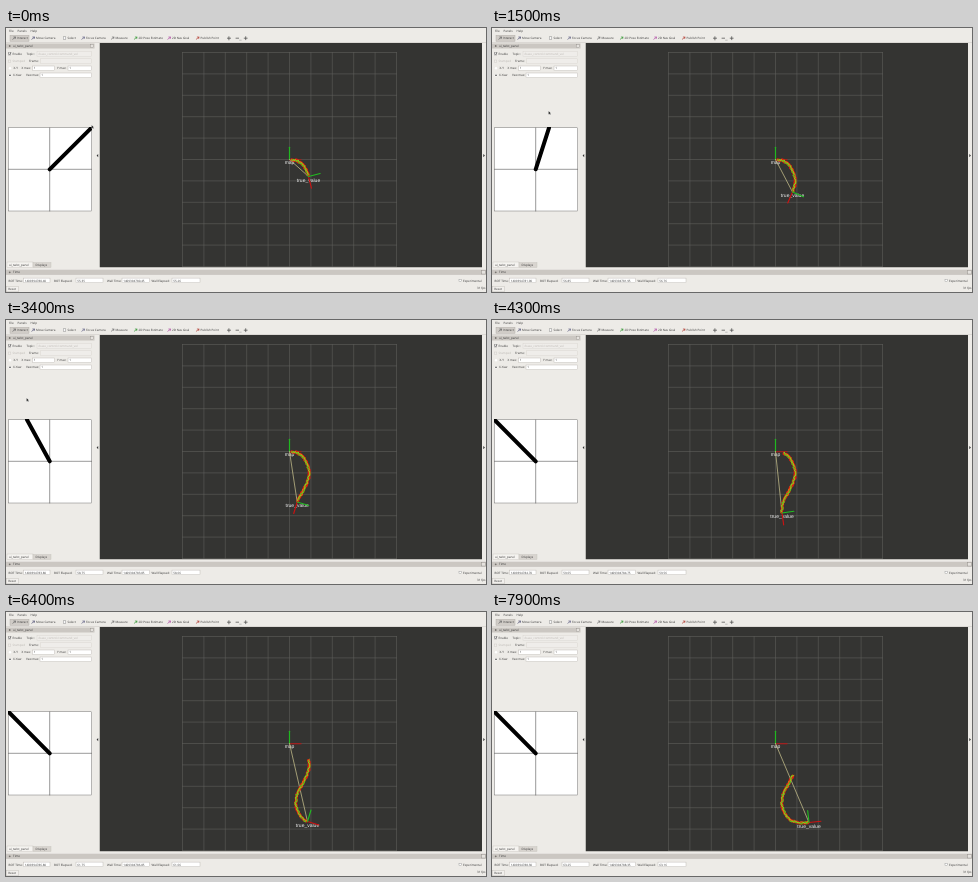
These frames come from a looping animation (480x264 px, 8 s). An HTML page:

```html
<!DOCTYPE html>
<html lang="en">
<head>
<meta charset="utf-8">
<title>Robot teleoperation view</title>
<style>
  html, body { margin: 0; width: 100%; height: 100%; overflow: hidden; background: #edebe7; }
  svg { display: block; width: 100vw; height: 100vh; }
  text { font: 3px "Open Sans", "Noto Sans", sans-serif; fill: #333; text-rendering: geometricPrecision; white-space: pre; }
  .off { fill: #bbb7b2; }
  .tag { font: 5px "Liberation Sans", Arial, sans-serif; fill: #eee; text-anchor: middle; }
  .line { fill: none; stroke-linejoin: round; stroke-linecap: round; }
</style>
</head>
<body>
<svg id="stage" viewBox="0 0 480 264" preserveAspectRatio="none">
  <defs>
    <clipPath id="padClip"><rect x="2" y="99" width="84" height="84.5"/></clipPath>
    <clipPath id="viewClip"><rect x="93.5" y="15" width="382.5" height="224.5"/></clipPath>
  </defs>
  <g id="ui"></g>
  <g id="pad"></g>
  <g id="view" clip-path="url(#viewClip)"></g>
  <path id="cursor" d="M0 0V3.6L.9 2.8L1.5 4.1L2.1 3.8L1.5 2.6H2.6Z" fill="#111" stroke="#fff" stroke-width=".25"/>
</svg>
<script>
const LOOP = 8000, STEP = 100, TRAIL = 6.5;
const $ = id => document.getElementById(id);
const ui = $('ui'), pad = $('pad'), view = $('view');

function add(parent, tag, attrs, content) {
  const el = document.createElementNS('http://www.w3.org/2000/svg', tag);
  for (const k in attrs) el.setAttribute(k, attrs[k]);
  if (content !== undefined) el.textContent = content;
  parent.appendChild(el);
  return el;
}
const rect = (x, y, width, height, fill, stroke = 'none', parent = ui) =>
  add(parent, 'rect', { x, y, width, height, fill, stroke, 'stroke-width': .4 });
const label = (x, y, s, cls = '') => add(ui, 'text', { x, y, class: cls }, s);
const line = (parent, stroke, width, d = '') =>
  add(parent, 'path', { d, stroke, 'stroke-width': width, class: 'line' });
const dot = (cx, cy, r, fill) => add(ui, 'circle', { cx, cy, r, fill });

function field(x, y, width, value = '', off = false) {
  rect(x, y - 2.3, width, 4.6, off ? '#efedea' : '#fff', off ? '#d5d1cc' : '#b5b0aa');
  return label(x + 1.2, y + 1.1, value, off ? 'off' : '');
}
function titleBar(y, width, height, name) {
  rect(0, y, width, height, '#cbc7c2');
  label(7, y + height / 2 + 1, name);
  dot(3.7, y + height / 2, .9, '#77736e');
  rect(width - 4.3, y + height / 2 - 1.7, 3.6, 3.4, '#e5e2de', '#8c8883');
}

function buildToolbar() {
  [[3, 'File'], [11.5, 'Panels'], [24.5, 'Help']].forEach(([x, s]) => label(x, 3.7, s));
  rect(0, 14.5, 480, .5, '#c9c5c0');
  rect(4, 7.3, 19, 6, '#d0ccc7', '#aaa6a1');
  const tools = [
    [11, 'Interact', '#666'], [30, 'Move Camera', '#557'], [61.5, 'Select', '#777'],
    [80, 'Focus Camera', '#668'], [109.5, 'Measure', '#777'], [132.5, '2D Pose Estimate', '#3a9a3a'],
    [166, '2D Nav Goal', '#b04fa5'], [194.5, 'Publish Point', '#b5443a']
  ];
  tools.forEach(([x, s, color], i) => {
    label(x, 11.3, s);
    if (i === 2) rect(x - 4.3, 8.8, 2.6, 2.6, '#f8f8f8', color);
    else line(ui, color, .7, `M${x - 4.2} 11.2l2.6-2M${x - 3.2} 9l1.7.1l-.3 1.5`);
  });
  line(ui, '#444', .7, 'M221.4 10.2h3.2M222.9 8.7v3.2M230 10.2h2.6M238.2 10.2h3M239.7 8.7v3');
  line(ui, '#777', .4, 'M233.6 12.2h1.6');
}

function buildPanel() {
  titleBar(15.5, 88.5, 5, 'ui_twist_panel');
  rect(2.4, 24.6, 2.4, 2.4, '#fff', '#777');
  line(ui, '#222', .5, 'M2.9 25.8l.7.7l1.2-1.7');
  label(6.5, 27, 'Enable');
  label(20.5, 27, 'Topic:');
  field(31, 25.9, 54.5, '/base_control/command_vel', true);
  rect(2.4, 32, 2.4, 2.4, '#efedea', '#cbc7c2');
  label(6.5, 34.2, 'Stamped', 'off');
  label(23, 34.2, 'Frame:');
  field(34.5, 33.1, 51, '', true);
  dot(4, 40.3, 1.2, '#fff');
  label(7.5, 41.4, 'X-Y');
  label(15.5, 41.4, 'X max:');
  field(26.5, 40.3, 22, '1');
  label(51, 41.4, 'Y max:');
  field(62, 40.3, 23.5, '1');
  dot(4, 47.3, 1.3, '#fff');
  dot(4, 47.3, .8, '#333');
  label(7, 48.4, 'X-Yaw');
  label(20, 48.4, 'Yaw max:');
  field(34, 47.3, 51.5, '1');

  rect(1, 234, 26, 5.6, '#f5f3f0', '#c4c0bb');
  rect(27, 234.5, 18, 5, '#d8d4cf', '#c4c0bb');
  label(3, 237.9, 'ui_twist_panel');
  label(29.5, 237.9, 'Displays');
  add(ui, 'path', { d: 'M92.2 126v3.2l-1.6-1.6ZM477.3 126v3.2l1.6-1.6Z', fill: '#333' });
}

function buildTimeBar() {
  titleBar(241.7, 480, 5.2, 'Time');
  label(2.5, 253.5, 'BOT Time:');
  label(48, 253.5, 'BOT Elapsed:');
  label(101, 253.5, 'Wall Time:');
  label(145.5, 253.5, 'Wall Elapsed:');
  rect(453, 251.2, 2.4, 2.4, '#fff', '#888');
  label(457, 253.5, 'Experimental');
  rect(.5, 258.4, 12, 5.4, '#f1efec', '#bcb8b3');
  label(2.2, 262, 'Reset');
  label(471, 261.3, '31 fps');
  return [[17.5, 26.5], [70, 27], [116, 27.5], [166, 28]].map(([x, w]) => field(x, 252.4, w));
}

function buildView() {
  rect(93.5, 15, 382.5, 224.5, '#343432', 'none', view);
  let d = '';
  for (let i = 0; i <= 10; i++) {
    const s = i * 21.4;
    d += `M${176.5 + s} 24.5v214M176.5 ${24.5 + s}h214`;
  }
  line(view, '#62625f', .55, d);
  add(view, 'text', { x: 283.5, y: 136.2, class: 'tag' }, 'map');
  line(view, '#bb1414', 1.1, 'M283.5 131.8H295');
  line(view, '#20b820', 1.2, 'M283.5 131.5V119.3');
}

buildToolbar();
buildPanel();
const clocks = buildTimeBar();
buildView();

rect(2.5, 99.8, 83, 83.2, '#fff', '#555', pad);
line(pad, '#555', .6, 'M43.7 100v83M2.5 141.3h83');
const stick = line(pad, '#000', 4);
stick.setAttribute('clip-path', 'url(#padClip)');

const tag = add(view, 'text', { class: 'tag' }, 'true_value');
const link = line(view, '#d2ca93', .7);
const redTrail = line(view, '#e0200f', 2.9);
const greenTrail = line(view, '#4fc41c', 1.2);
const goldTrail = line(view, '#d9c21f', .55);
const axisX = line(view, '#d01010', 1.1);
const axisY = line(view, '#20bd20', 1.1);

// seconds, x, y along the driven route
const route = [
  [-3.1, 283.5, 131.5], [-2.2, 291.5, 133], [-.9, 299, 139.5], [0, 302.5, 148.5],
  [.7, 303.2, 156], [1.5, 300.5, 164], [2.4, 296, 173], [3.4, 291.2, 182],
  [4.3, 290, 193], [5.6, 294.5, 204], [6.4, 301.5, 209.5], [7.9, 317, 210.5], [8.9, 326.5, 207]
];
// seconds, x, y of the pointer
const pointer = [[0, 86, 97], [.5, 82, 92], [1.5, 57, 83], [2.4, 43, 80], [3.4, 21, 78], [4.2, -4, 84], [8, -4, 84]];

function segment(table, t) {
  let i = 0;
  while (i < table.length - 2 && t > table[i + 1][0]) i++;
  return i;
}
function slope(i, axis) {
  const a = route[Math.max(0, i - 1)], b = route[Math.min(route.length - 1, i + 1)];
  return (b[axis] - a[axis]) / (b[0] - a[0]);
}
function routeAt(t) {
  const i = segment(route, t), a = route[i], b = route[i + 1];
  const h = b[0] - a[0], u = (t - a[0]) / h, v = 1 - u;
  return [1, 2].map(k =>
    v * v * (1 + 2 * u) * a[k] + u * u * (3 - 2 * u) * b[k] +
    h * u * v * (v * slope(i, k) - u * slope(i + 1, k)));
}
function pointerAt(t) {
  const i = segment(pointer, t), a = pointer[i], b = pointer[i + 1];
  const u = (t - a[0]) / (b[0] - a[0]);
  return [1, 2].map(k => a[k] + (b[k] - a[k]) * u);
}
function headingAt(t) {
  const [x0, y0] = routeAt(t - .05), [x1, y1] = routeAt(t + .05);
  return Math.atan2(y1 - y0, x1 - x0);
}
function noise(n) {
  const s = Math.sin(n * 12.9898) * 43758.5453;
  return (s - Math.floor(s)) * 2 - 1;
}
// Route samples shaken sideways by a fixed amount per sample
function trailPath(t, gap, shake, seed) {
  const points = [];
  const first = Math.ceil(Math.max(t - TRAIL, -2.9) / gap - 1e-6);
  const last = Math.floor((t - .05) / gap);
  for (let k = first; k <= last; k++) {
    const [x, y] = routeAt(k * gap), a = headingAt(k * gap);
    const off = shake * noise(k + seed);
    points.push((x - Math.sin(a) * off).toFixed(2) + ' ' + (y + Math.cos(a) * off).toFixed(2));
  }
  return 'M' + points.join('L');
}
const ray = (x, y, a, len) => `M${x} ${y}l${Math.cos(a) * len} ${Math.sin(a) * len}`;
const clamp = (v, lo, hi) => Math.min(hi, Math.max(lo, v));

function draw(t) {
  const [px, py] = pointerAt(t);
  stick.setAttribute('d', `M43.7 141.3L${clamp(px, 2.5, 85.5)} ${clamp(py, 99.8, 183)}`);
  $('cursor').setAttribute('transform', `translate(${px - .5} ${py})`);

  const [x, y] = routeAt(t), a = headingAt(t);
  tag.setAttribute('x', x);
  tag.setAttribute('y', y + 5);
  link.setAttribute('d', `M283.5 131.5L${x} ${y}`);
  redTrail.setAttribute('d', trailPath(t, .15, .6, 200));
  greenTrail.setAttribute('d', trailPath(t, .12, 1.1, 500));
  goldTrail.setAttribute('d', trailPath(t, .1, 1.2, 900));
  axisX.setAttribute('d', ray(x, y, a, 12));
  axisY.setAttribute('d', ray(x, y, a - Math.PI / 2, 12));

  [1409394780.4, 55.35, 1409394780.45, 55.26].forEach((base, i) => {
    clocks[i].textContent = (base + t).toFixed(2);
  });
}

const start = performance.now();
function tick() {
  const ms = (performance.now() - start) % LOOP;
  draw(Math.floor(ms / STEP) * STEP / 1000);
  requestAnimationFrame(tick);
}
tick();
</script>
</body>
</html>
```
